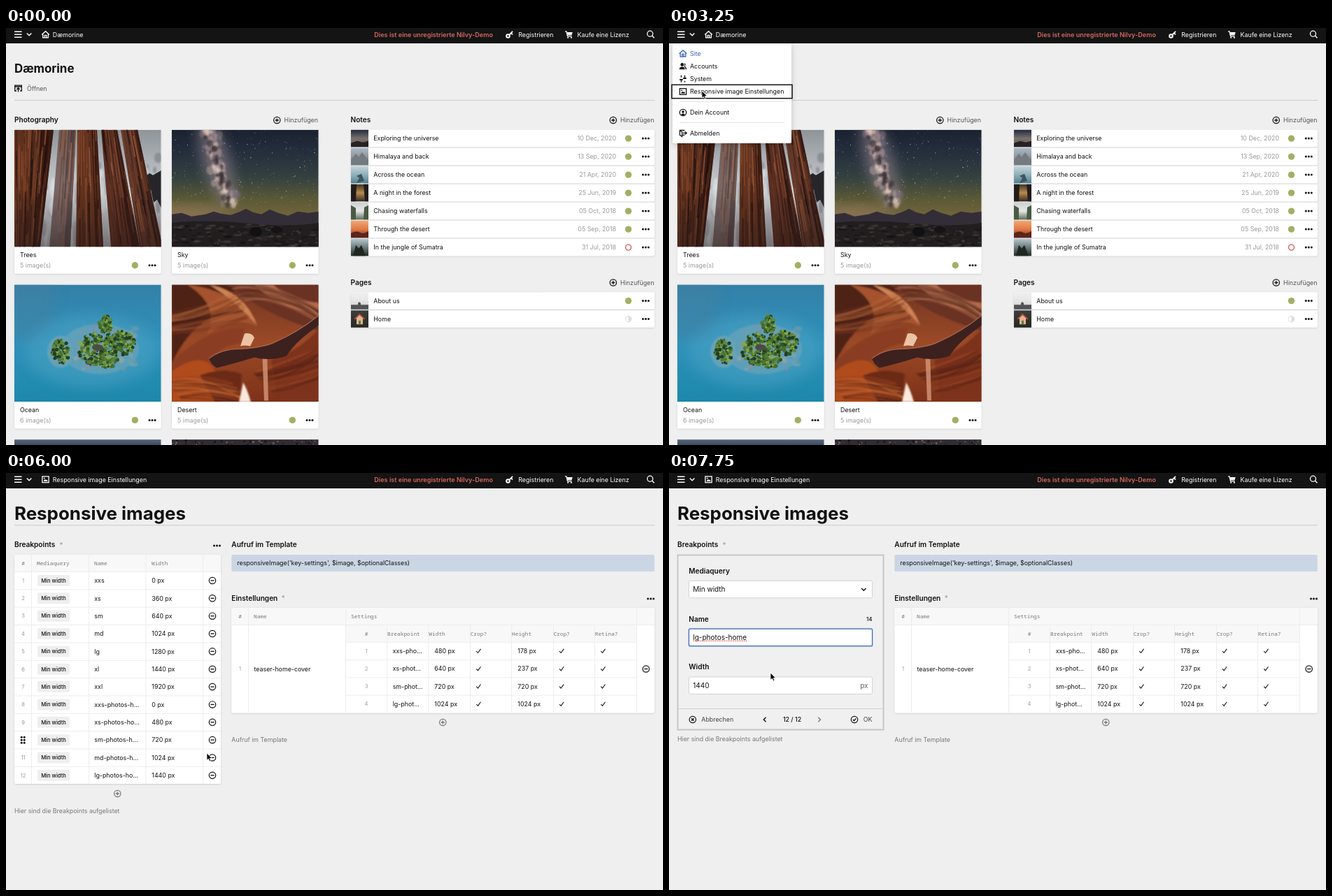
Animation of 939 by 597 pixels, one loop 8000 ms. Source, as an HTML page:

```html
<!DOCTYPE html>
<html lang="de">
<head>
<meta charset="utf-8">
<title>Panel</title>
<style>
html, body { margin: 0; width: 100%; height: 100%; overflow: hidden; background: #efefef; }
svg { display: block; width: 100%; height: 100%; font-family: Inter, Roboto, sans-serif; }
.mono { font-family: "Noto Sans Mono", "DejaVu Sans Mono", monospace; }
text { white-space: pre; }
</style>
</head>
<body>
<svg id="stage" viewBox="0 0 939 597"></svg>
<script>
const INK = '#111', GRAY = '#777', PALE = '#999', LINE = '#ededed';
const SITE = 'Dæmorine';

let seed = 7;
const rnd = (a = 0, b = 1) => {
  seed = (seed * 1664525 + 1013904223) % 4294967296;
  return a + (b - a) * seed / 4294967296;
};
const pick = list => list[Math.floor(rnd(0, list.length))];
const times = (n, fn) => Array.from({ length: n }, (_, i) => fn(i)).join('');

// Basic shapes; text is centred vertically on y
const rect = (x, y, w, h, fill, more = '') =>
  `<rect x="${x}" y="${y}" width="${w}" height="${h}" fill="${fill}" ${more}/>`;
const circle = (x, y, r, fill, more = '') =>
  `<circle cx="${x}" cy="${y}" r="${r}" fill="${fill}" ${more}/>`;
const ellipse = (x, y, rx, ry, fill, more = '') =>
  `<ellipse cx="${x}" cy="${y}" rx="${rx}" ry="${ry}" fill="${fill}" ${more}/>`;
const fillPath = (d, fill, more = '') => `<path d="${d}" fill="${fill}" ${more}/>`;
const stroke = (d, color = INK, w = 1.2, more = '') =>
  `<path d="${d}" fill="none" stroke="${color}" stroke-width="${w}" ${more}/>`;
const group = (s, more = '') => `<g ${more}>${s}</g>`;
const at = (x, y, s) => group(s, `transform="translate(${x} ${y})"`);
const text = (x, y, s, { size = 8.85, fill = INK, weight = 400, anchor = 'start', cls = '' } = {}) =>
  `<text x="${x}" y="${y + size * .364}" font-size="${size}" fill="${fill}" font-weight="${weight}" text-anchor="${anchor}" class="${cls}">${s}</text>`;
const head = (x, y, s) => text(x, y, s, { size: 10.1, weight: 600 });
const mono = (x, y, s, anchor = 'start') =>
  text(x, y, s, { size: 7.8, fill: GRAY, cls: 'mono', anchor });
const num = (x, y, s) => text(x, y, s, { size: 7.6, fill: PALE, anchor: 'middle' });
const grad = (id, ...stops) => `<linearGradient id="${id}" x2="0" y2="1">` +
  stops.map((c, i) => `<stop offset="${i / (stops.length - 1)}" stop-color="${c}"/>`).join('') + '</linearGradient>';

// Icons
const ring = (x, y, d, color = INK) =>
  at(x, y, circle(0, 0, 4.7, 'none', `stroke="${color}" stroke-width="1.2"`) + stroke(d, color, 1.3));
const plus = (x, y, color) => ring(x, y, 'M-2.6 0H2.6M0-2.6V2.6', color);
const minus = (x, y) => ring(x, y, 'M-2.6 0H2.6');
const more = (x, y) => times(3, i => circle(x - 4 + 4 * i, y, 1.5, INK));
const grip = y => times(6, i => circle(22.2 + i % 2 * 4, y - 4 + (i >> 1) * 4, 1.5, INK));
const check = (x, y) => stroke(`M${x} ${y + .3}l2.2 2.4l4-5.6`, INK, 1.1);
const house = (x, y, c) => at(x, y, stroke('M-5.3 .3L0-4.6L5.3 .3M-3.8-.8V4.6H3.8V-.8M-1.2 4.6V1H1.2V4.6', c, 1.3));
const picture = (x, y, c) => at(x, y,
  stroke('M-4.6-4.4H4.6V4.4H-4.6Z', c, 1.3) + fillPath('M-3 2.8L-.8-.6L.6 1L1.6 0L3.2 2.8Z', c) + circle(-1.8, -1.8, .9, c));
const live = (x, y) => circle(x, y, 4.7, '#a5ae62');
const add = (x, y) => plus(x, y, INK) + text(x + 10.3, y, 'Hinzufügen', { fill: '#555' });

// Photographs, drawn on a 210 by 168 field
const soft = (s, alpha = 1) => group(s, `filter="url(#soft)" opacity="${alpha}"`);
const haze = (s, alpha = 1) => group(s, `filter="url(#blur)" opacity="${alpha}"`);

const trunk = (a, b, c, d, color) => {
  const edge = (u, y) => a + (b - a) * u + ((c - a) * (1 - u) + (d - b) * u) * y / 168;
  const bark = times(Math.round((b - a) * 1.8), () => {
    const u = rnd(.03, .97), y = rnd(-60, 130), end = y + rnd(30, 110);
    return stroke(`M${edge(u, y)} ${y}L${edge(u, end)} ${end}`, pick(['#1f0e0c', '#2e1611', '#a5603c', '#8a4729']), rnd(.5, 2.2), `opacity="${rnd(.25, .7)}"`);
  });
  const shade = fillPath(`M${edge(.72, 0)} 0H${b}L${d} 168H${edge(.72, 168)}Z`, '#1c0d0c', 'opacity=".5"');
  return fillPath(`M${a} 0H${b}L${d} 168H${c}Z`, color) + shade + bark;
};
const trees = () => rect(0, 0, 210, 168, 'url(#fog)') +
  soft(times(60, () => ellipse(rnd(40, 210), rnd(40, 168), rnd(1, 6), rnd(4, 18), pick(['#eceef0', '#d8dce0', '#6d7279', '#8b9097']))), .5) +
  group(trunk(64, 88, 50, 80, '#66504e'), 'opacity=".8"') +
  fillPath('M184 70L193 62L198 65L210 58V112L204 100L199 104L195 86L188 82Z', '#26262a') +
  trunk(152, 176, 179, 212, '#62382a') + trunk(124, 147, 138, 179, '#5a2f22') +
  trunk(90, 118, 88, 127, '#63331f') + trunk(-14, 56, -6, 37, '#5e311f') +
  rect(0, 0, 210, 168, 'url(#shade)');

const milky = (n, w, colors, r, alpha) => times(n, () => {
  const u = rnd(), spread = (rnd() + rnd() - 1) * w;
  return ellipse(50 + 34 * u + spread, 108 * u, rnd(r / 3, r), rnd(r / 3, r * 1.3), pick(colors), `opacity="${alpha}"`);
});
const sky = () => rect(0, 0, 210, 168, 'url(#night)') +
  haze(ellipse(64, 46, 20, 66, '#8d7f88', 'transform="rotate(-17 64 46)"'), .6) +
  soft(milky(70, 17, ['#c7aaa4', '#8d7f8a', '#6c6674'], 6, .45) + milky(34, 9, ['#f0d9cb', '#dbb7a8'], 5, .5) +
    milky(22, 11, ['#2b2730', '#3d3238'], 5, .65)) +
  times(330, () => circle(rnd(0, 210), rnd(0, 108), rnd(.2, .6), '#e6ebf2', `opacity="${rnd(.2, .9)}"`)) +
  haze(ellipse(20, 118, 60, 8, '#ad8a72'), .55) +
  fillPath('M0 121L14 119L28 124L48 121L60 117L70 120L84 122L98 117L106 113L116 118L128 121L140 114L152 119L166 123L180 117L195 119L210 117V168H0Z', '#332d38') +
  fillPath('M0 133Q50 128 110 134T210 133V168H0Z', '#211e1f') +
  times(170, () => ellipse(rnd(0, 210), rnd(135, 168), rnd(1, 6), rnd(.5, 2), pick(['#121112', '#38332f', '#4b443f', '#191718']), 'opacity=".6"')) +
  ellipse(120, 146, 9, 7, '#111012') + ellipse(150, 143, 8, 5, '#141315');

const leaf = (x, y, rx, ry, n) => times(n, () => {
  const a = rnd(0, 6.283), r = Math.sqrt(rnd());
  return circle(x + rx * r * Math.cos(a), y + ry * r * Math.sin(a), rnd(1, 2.9), pick(['#2f5427', '#456f2e', '#5f8a36', '#82a94a', '#233f22', '#587b35']));
});
const ocean = () => rect(0, 0, 210, 168, 'url(#sea)') +
  haze(ellipse(110, 95, 95, 52, '#4fa3c4'), .5) + haze(ellipse(10, 20, 50, 60, '#4a7f9f'), .4) +
  soft(ellipse(122, 92, 56, 36, '#6fa3b8') + ellipse(66, 96, 19, 23, '#7ba6b4'), .65) +
  soft(times(50, () => ellipse(rnd(88, 174), rnd(62, 122), rnd(2, 6), rnd(2, 5), pick(['#a5a9a2', '#8d8fa0', '#7c9da4']))), .55) +
  leaf(66, 96, 12, 18, 110) + leaf(112, 93, 20, 23, 200) + leaf(150, 84, 23, 18, 200) +
  leaf(130, 57, 10, 13, 80) + leaf(132, 108, 18, 11, 110) + ellipse(119, 90, 8, 4.5, '#4d4c42');

const strata = (n, x, y, dx, dy, colors) => times(n, () => {
  const o = rnd(-14, 14);
  return stroke(`M${x + o} ${y + o}q${dx * .5} ${rnd(-16, 4)} ${dx} ${dy + rnd(-10, 10)}`, pick(colors), rnd(.6, 3), `opacity="${rnd(.15, .5)}"`);
});
const desert = () => rect(0, 0, 210, 168, 'url(#rock)') + soft(
  fillPath('M0 0H92Q84 30 54 48Q22 66 0 112Z', '#4f2419') +
  fillPath('M22 0Q92 8 122 60Q88 44 50 72Q70 30 22 0Z', '#a4532f') +
  fillPath('M54 0Q104 10 122 58Q92 24 54 0Z', '#cf8354') +
  fillPath('M88 0Q118 38 210 66V0Z', '#6b3123') +
  fillPath('M118 0Q150 33 210 42V26Q165 22 145 0Z', '#b3694a') +
  fillPath('M0 112Q46 62 104 62L98 84Q68 88 54 106Q40 120 0 150Z', '#8a3c20') +
  fillPath('M0 124Q45 92 62 124Q70 150 96 168H0Z', '#b04b1f') +
  fillPath('M40 130Q70 118 100 128L96 168H62Z', '#6b2a18') +
  fillPath('M142 108Q180 96 210 64V168H152Z', '#7d321c') +
  strata(40, -20, 60, 120, -30, ['#35150f', '#c3703f', '#7c3620']) +
  strata(40, 90, 10, 130, 40, ['#3d1a13', '#c98059', '#8d4630']) +
  strata(40, 0, 150, 100, 10, ['#541f11', '#d9753a', '#96401c']) +
  strata(36, 130, 140, 90, -30, ['#401a11', '#b65a33', '#692a18'])) +
  fillPath('M104 70Q114 68 118 76L112 88Q104 86 98 88Z', '#edc3a6') +
  fillPath('M129 92H136L138 166H132Z', '#d59879', 'opacity=".8"') +
  fillPath('M53 106Q70 92 98 92Q132 90 148 82Q180 68 210 44V58Q176 82 164 102Q140 110 118 104Q86 114 64 119Q56 114 53 106Z', '#3c211e') +
  stroke('M53 106Q70 92 98 92Q132 90 148 82Q180 68 210 44', '#a76550', 1.2) +
  soft(fillPath('M96 168L102 140Q108 150 113 168Z', '#fbe9dd'));

const shadow = 'filter="url(#drop)"';
const card = (x, y, photo, title, note) => at(x, y,
  rect(0, 0, 209.5, 206, '#fff', `rx="2" ${shadow}`) +
  `<svg width="209.5" height="167.5" viewBox="0 0 209.5 167.5">${photo}</svg>` +
  text(8, 179.5, title) + text(8, 194, note, { fill: PALE }) + live(172.3, 194) + more(197, 194));

const thumb = (colors, d, ink) => {
  const id = 'th' + colors.join('').replace(/#/g, '');
  return `<defs>${grad(id, ...colors)}</defs>` + rect(0, 0, 25, 24.5, `url(#${id})`) + fillPath(d, ink);
};
const thumbs = [
  [['#222b3d', '#79706e', '#665f45'], 'M0 19L9 16L17 18L25 16V24.5H0Z', '#252125'],
  [['#aab9c8', '#8f989d', '#5d6058'], 'M0 17L7 8L11 13L16 6L25 18V24.5H0Z', '#737b80'],
  [['#c5d4d9', '#8fb0ba', '#537f8f'], 'M8 14L15 11L19 21L8 24.5L12 17Z', '#3c5661'],
  [['#3e3226', '#b98b4f', '#302923'], 'M0 0H8L7 24.5H0ZM18 0H25V24.5H20Z', '#201d1a'],
  [['#cbd0cf', '#e4e7e6', '#5c6c58'], 'M0 4L7 8V24.5H0ZM19 7L25 4V24.5H18Z', '#4a5944'],
  [['#f1a875', '#e17945', '#6e2f20'], 'M0 18Q8 14 13 17T25 15V24.5H0Z', '#5b251c'],
  [['#b7c6cd', '#6a7c7c', '#222b26'], 'M3 24.5L7 9L11 14L15 9L21 24.5Z', '#202620'],
  [['#f0f0f0', '#e6e6e7', '#c9c9ca'], 'M0 18H10V16Q12 12 14 16V18H25V24.5H0Z', '#515356'],
  [['#3b403c', '#31342f', '#272923'], 'M6 12L12 6L19 12H17V20H8V12Z', '#dfb68c']
];
const row = (y, i, title, date = '') => at(493, y,
  rect(0, 0, 434, 24.5, '#fff', `rx="2" ${shadow}`) + thumb(...thumbs[i]) +
  (i === 8 ? stroke('M5 12.5L12.3 5.5L20 12.5', '#b3463b', 1.8) + rect(11, 14.5, 3, 5.5, '#5f7a4a') : '') +
  text(32.3, 12.3, title) + text(379, 12.3, date, { fill: PALE, anchor: 'end' }) +
  (i === 6 ? circle(396.5, 12.3, 4, '#fff', 'stroke="#cf5b57" stroke-width="1.3"')
    : i === 8 ? circle(396.5, 12.3, 4.2, '#fff', 'stroke="#ddd"') + fillPath('M396.5 8.1a4.2 4.2 0 0 1 0 8.4Z', '#ddd')
    : live(396.5, 12.3)) + more(421.3, 12.3));
const notes = [['Exploring the universe', '10 Dec, 2020'], ['Himalaya and back', '13 Sep, 2020'],
  ['Across the ocean', '21 Apr, 2020'], ['A night in the forest', '25 Jun, 2019'],
  ['Chasing waterfalls', '05 Oct, 2018'], ['Through the desert', '05 Sep, 2018'],
  ['In the jungle of Sumatra', '31 Jul, 2018']];

const home = () =>
  text(12, 58, SITE, { size: 16.9, weight: 700 }) +
  at(17.5, 86.5, stroke('M-2.5 3.5H-4.8V-4.3H4.8V3.5H2.5M-4.8-2.5H4.8M0 5V-.5M-2.2 1.5L0-.8L2.2 1.5', INK, 1.3)) +
  text(30, 86.5, 'Öffnen', { fill: '#555' }) +
  rect(12, 103, 915, 1, '#cbcbcb') +
  head(12, 131.5, 'Photography') + add(387.3, 132) + head(492.5, 131.5, 'Notes') + add(867.8, 132) +
  card(12, 145.7, trees(), 'Trees', '5 image(s)') + card(237, 145.7, sky(), 'Sky', '5 image(s)') +
  card(12, 367.4, ocean(), 'Ocean', '6 image(s)') + card(237, 367.4, desert(), 'Desert', '5 image(s)') +
  rect(12, 589.2, 209.5, 8, 'url(#dusk)') + rect(237, 589.2, 209.5, 8, '#302c32') +
  times(50, () => circle(rnd(238, 446), rnd(590, 597), rnd(.5, 1.8), pick(['#15151a', '#6d565c']))) +
  notes.map(([title, date], i) => row(145.8 + 26 * i, i, title, date)).join('') +
  head(492.5, 364, 'Pages') + add(867.8, 364.5) +
  row(378.3, 7, 'About us') + row(404.3, 8, 'Home');

const menu = () => rect(5, 22.5, 170, 142.5, '#fff', 'rx="2" filter="url(#lift)"') +
  ['Site', 'Accounts', 'System', 'Responsive image Einstellungen', 'Dein Account', 'Abmelden'].map((s, i) =>
    text(30, [36.3, 54.7, 72.8, 91, 121, 150.8][i], s, { fill: i ? INK : '#3b62b4' })).join('') +
  rect(15, 105, 150, 1, '#e2e2e2') + rect(15, 135, 150, 1, '#e2e2e2') +
  house(20, 36.5, '#3b62b4') +
  at(20, 54.7, circle(-1.2, -2.3, 2.4, INK) + fillPath('M-5.3 4.5Q-5 .8-1.2 .8T2.6 4.5Z', INK) + fillPath('M1.8-4.5A2.4 2.4 0 0 1 2.2 0Q5 .8 5.2 4.5H3.8Q3.6 2 1.4 .4Q3-2 1.8-4.5Z', INK)) +
  at(20, 72.8, stroke('M-2.5-5V-2M-2.5 1V5M2.5-5V0M2.5 3V5', INK, 1.4) + stroke('M-4.8 1H-.2M.2-.8H4.8', INK, 1.8)) +
  picture(20, 91, INK) +
  at(20, 121, circle(0, 0, 4.7, 'none', `stroke="${INK}" stroke-width="1.3"`) + circle(0, -1, 1.8, INK) + fillPath('M-3 3Q0 .2 3 3Q0 5 -3 3Z', INK)) +
  at(20, 150.8, stroke('M1.5-3V-4.5H-4.5V2.5L-1.3 4.8V-2L-4.5-4.5M-1 2.5H1.5V1.5M0-.5H5M3-2.7L5.2-.5L3 1.7', INK, 1.3));

// Structure tables
const ROW = 25.35;
const rowY = i => 154 + ROW * i;
const points = [['xxs', 0], ['xs', 360], ['sm', 640], ['md', 1024], ['lg', 1280], ['xl', 1440], ['xxl', 1920],
  ['xxs-photos-h...', 0], ['xs-photos-ho...', 480], ['sm-photos-h...', 720], ['md-photos-h...', 1024], ['lg-photos-ho...', 1440]];
const bars = (xs, y, h) => xs.map(x => rect(x, y, 1, h, LINE)).join('');
const hint = y => text(12, y, 'Hier sind die Breakpoints aufgelistet', { fill: GRAY });

const table = () => more(301.5, 104) +
  rect(12, 117, 295, 328, '#fff', `rx="2" ${shadow}`) + rect(12, 117, 295, 24.5, '#f8f8f8', 'rx="2"') +
  bars([36, 118, 199.5, 281], 117, 328) +
  mono(24.5, 129, '#', 'middle') + mono(44, 129, 'Mediaquery') + mono(126, 129, 'Name') + mono(208, 129, 'Width') +
  points.map(([name, width], i) => {
    const y = rowY(i);
    return rect(12, y - 13, 295, 1, LINE) + group(num(24.5, y, i + 1), `id="n${i}"`) +
      rect(45, y - 8, 46, 16, '#efefef', 'rx="2"') + text(68, y, 'Min width', { size: 7.6, weight: 500, anchor: 'middle' }) +
      text(126.3, y, name) + text(208.3, y, width + ' px') + minus(295, y);
  }).join('') + plus(159.3, 459, GRAY) + hint(483.5);

const field = (y, value) => rect(28.5, y, 262, 24.5, '#fff', 'rx="2" stroke="#d3d3d3"') + text(34.3, y + 12.4, value, { size: 10 });
const form = () =>
  rect(12.5, 117.5, 294, 250, '#f0f0f0', 'stroke="#dcdcdc" stroke-width="3"') +
  rect(12.5, 117.5, 294, 250, 'none', 'stroke="#c4c4c4"') +
  head(28.3, 140, 'Mediaquery') + field(154.3, 'Min width') + stroke('M275 165l3.3 3.3l3.3-3.3', INK, 1.4) +
  head(28.3, 209, 'Name') + text(290.5, 209.5, '14', { size: 8, weight: 500, anchor: 'end' }) +
  rect(28.5, 223.2, 262, 24.5, '#fff', 'rx="2" stroke="#c9d5ee" stroke-width="3"') +
  rect(28.5, 223.2, 262, 24.5, '#fff', 'rx="2" stroke="#4870bd" stroke-width="1.2"') +
  text(34.3, 235.6, 'lg-photos-home', { size: 10 }) +
  stroke('M34.5 240.4H111', '#e0443e', 1.3, 'stroke-dasharray="1.3 1.3"') +
  rect(111.5, 229.5, 1, 12.5, INK, 'id="caret"') +
  head(28.3, 277.7, 'Width') + field(292, '1440') + text(284.5, 304.4, 'px', { size: 10, fill: '#666', anchor: 'end' }) +
  rect(13, 337, 293, 1, '#d2d2d2') +
  ring(33.8, 353, 'M-1.8-1.8L1.8 1.8M1.8-1.8L-1.8 1.8') + text(46.3, 353, 'Abbrechen', { fill: '#444' }) +
  stroke('M138.5 349.8l-3.2 3.2l3.2 3.2', INK, 1.4) + text(176, 353, '12 / 12', { anchor: 'middle', weight: 500 }) +
  stroke('M213.3 349.8l3.2 3.2l-3.2 3.2', GRAY, 1.3) +
  ring(265, 353, 'M-2.1 0L-.5 1.7L2.3-1.7') + text(277.7, 353, 'OK', { fill: '#444' }) + hint(380.5);

const settings = [['xxs-pho...', 480, 178], ['xs-phot...', 640, 237], ['sm-phot...', 720, 720], ['lg-phot...', 1024, 1024]];
const heads = ['Breakpoint', 'Width', 'Crop?', 'Height', 'Crop?', 'Retina?'];
const responsive = () =>
  text(12, 57.8, 'Responsive images', { size: 25.9, weight: 700 }) + rect(12, 74.3, 915, 1, '#cbcbcb') +
  head(12, 102.8, 'Breakpoints') + text(76.5, 103.5, '*', { size: 10, fill: PALE }) +
  head(322.3, 102.8, 'Aufruf im Template') + rect(322.3, 117, 604.5, 24, '#cbd6e4', 'rx="2"') +
  text(330.3, 129, "responsiveImage('key-settings', $image, $optionalClasses)") +
  head(322.3, 179, 'Einstellungen') + text(393.7, 179.5, '*', { size: 10, fill: PALE }) + more(921.5, 180) +
  rect(322.3, 193, 604.5, 150.5, '#fff', `rx="2" ${shadow}`) + rect(322.3, 193, 604.5, 24.5, '#f8f8f8', 'rx="2"') +
  rect(486, 217.5, 415.5, 24.5, '#f8f8f8') + rect(322.3, 217, 604.5, 1, LINE) +
  bars([346, 485, 901], 193, 150.5) + bars([544, 603, 663, 722, 782, 841], 217, 126.5) +
  mono(334.5, 205, '#', 'middle') + mono(354, 205, 'Name') + mono(493, 205, 'Settings') +
  group(num(334.5, 280.5, 1), 'id="rowNum"') + text(354.5, 280.5, 'teaser-home-cover') + minus(914.7, 280.5) +
  mono(515, 230, '#', 'middle') + heads.map((s, i) => mono(545 + 59.35 * i, 230, s)).join('') +
  settings.map(([name, w, h], i) => {
    const y = 254.8 + 25.3 * i;
    return rect(486, y - 13, 415.5, 1, LINE) + num(515, y, i + 1) + text(552.7, y, name) +
      text(612.3, y, w + ' px') + check(672.3, y) + text(731.3, y, h + ' px') + check(791, y) + check(850.3, y);
  }).join('') + plus(624.3, 357, GRAY) + text(322.3, 382, 'Aufruf im Template', { fill: GRAY });

const white = { fill: '#fff' };
const bar = () => rect(0, 0, 939, 22, '#141414') +
  stroke('M12 5.3H22.5M12 9.3H22.5M12 13.3H22.5', '#fff', 1.4) + stroke('M29.8 7.5l3.3 3.3l3.3-3.3', '#fff', 1.4) +
  group(house(56.5, 9.3, '#fff') + text(66.8, 9.3, SITE, white), 'id="crumbHome"') +
  group(picture(56.5, 9.3, '#fff') + text(66.8, 9.3, 'Responsive image Einstellungen', white), 'id="crumbImages"') +
  text(526.3, 9.3, 'Dies ist eine unregistrierte Nilvy-Demo', { size: 9.1, weight: 600, fill: '#d4685f' }) +
  at(719.8, 9.3, circle(-2.3, 2.2, 2.3, 'none', 'stroke="#fff" stroke-width="2"') + stroke('M-.6 .5L4.3-4.4M2-2.2L4.2 .2', '#fff', 1.8)) +
  text(732.3, 9.3, 'Registrieren', white) +
  at(804.5, 9.3, stroke('M-5.5-4.5H-3.5L-2 2.3H4', '#fff', 1.3) + fillPath('M-3-3.3H5.2L4 1H-2Z', '#fff') + circle(-1.3, 4.4, 1.1, '#fff') + circle(3.4, 4.4, 1.1, '#fff')) +
  text(816.5, 9.3, 'Kaufe eine Lizenz', white) +
  at(921.3, 9, circle(-.8, -.8, 4, 'none', 'stroke="#fff" stroke-width="1.3"') + stroke('M2 2L5.2 5.2', '#fff', 1.4));

document.getElementById('stage').innerHTML = `<defs>
  <filter id="blur" x="-50%" y="-50%" width="200%" height="200%"><feGaussianBlur stdDeviation="9"/></filter>
  <filter id="soft" x="-20%" y="-20%" width="140%" height="140%"><feGaussianBlur stdDeviation="1.3"/></filter>
  <filter id="drop" x="-5%" y="-20%" width="110%" height="150%"><feDropShadow dx="0" dy=".7" stdDeviation=".8" flood-opacity=".16"/></filter>
  <filter id="lift" x="-10%" y="-10%" width="120%" height="125%"><feDropShadow dx="0" dy="2" stdDeviation="4" flood-opacity=".2"/></filter>
  ${grad('fog', '#8f9499', '#c9cdd1', '#b4b8bd')}${grad('shade', '#20141400', '#20141400', '#20141470')}
  ${grad('night', '#1b2130', '#252f3d', '#33403f', '#5c5a36', '#7d6a3e', '#252124')}
  ${grad('sea', '#3380a8', '#2f92bb', '#1c88ab')}${grad('rock', '#6f3522', '#9c4a26', '#7c3119')}${grad('dusk', '#57677f', '#3e4a5d')}
  </defs>` + rect(0, 0, 939, 597, '#efefef') +
  group(home(), 'id="home"') +
  group(responsive() + group(table(), 'id="table"') + group(form(), 'id="form"'), 'id="images"') +
  bar() + group(menu(), 'id="menu"') +
  rect(4, 81.3, 172, 19.4, 'none', `id="focus" stroke="${INK}" stroke-width="1.5"`) +
  group('', 'id="grip"') + rect(-3, 596, 288, 14, '#c9c9c9', 'id="status" rx="3"') +
  fillPath('M0 0V10.3L2.4 8.2L4 11.7L5.7 10.9L4.2 7.5H7.4Z', '#000', 'id="cursor" stroke="#fff" stroke-width=".8"');

const $ = id => document.getElementById(id);
const show = (id, on) => $(id).setAttribute('visibility', on ? 'inherit' : 'hidden');

// Pointer stops: time, x, y; a repeated place is a rest
const stops = [[250, 234, 28], [1250, 36, 8], [1500, 30, 13], [2250, 29, 13], [3000, 47, 90], [4250, 47, 90],
  [4500, 165, 146], [4650, 286, 171], [5000, 286, 171], [5250, 640, 265], [5500, 911, 340], [5750, 911, 340],
  [5900, 300, 383], [6000, 287, 401], [6250, 200, 428], [6500, 164, 434], [7000, 153, 436], [7250, 153, 436],
  [7500, 148, 345], [7750, 145, 286]];
function pointer(t) {
  const i = stops.findIndex(s => s[0] >= t);
  if (i < 0) return stops[stops.length - 1].slice(1);
  if (i === 0) return stops[0].slice(1);
  const [a, b] = [stops[i - 1], stops[i]], u = (t - a[0]) / (b[0] - a[0]);
  return [a[1] + (b[1] - a[1]) * u, a[2] + (b[2] - a[2]) * u];
}

const STEP = 250, LOOP = 8000, HOVER_LAG = 80;
let last = -1;
function draw(now) {
  const t = Math.floor(now % LOOP / STEP) * STEP;
  if (t === last) return;
  last = t;
  const images = t >= 3500, edit = t >= 6500;
  show('home', !images);
  show('images', images);
  show('crumbHome', !images);
  show('crumbImages', images);
  show('table', images && !edit);
  show('form', edit);
  show('caret', edit && t < 7500);
  show('menu', t >= 1500 && !images);
  show('focus', t === 3250);
  show('status', t === 3500 || t === 3750);
  $('status').setAttribute('y', t === 3750 ? 588 : 596);

  show('cursor', t >= 250);
  $('cursor').setAttribute('transform', `translate(${pointer(t)})`);

  // Hovered rows swap their number for a grip, a moment behind the pointer
  const [x, y] = pointer(t - HOVER_LAG);
  const hover = images && !edit && x < 307 ? Math.floor((y - 141.3) / ROW) : -1;
  const nested = images && x > 322 && y > 217 && y < 344;
  points.forEach((_, i) => show('n' + i, i !== hover));
  show('rowNum', !nested);
  $('grip').innerHTML = nested ? at(310.3, 0, grip(280.5)) : hover >= 0 ? grip(rowY(hover)) : '';
}
function tick(now) {
  draw(now);
  requestAnimationFrame(tick);
}
draw(0);
requestAnimationFrame(tick);
</script>
</body>
</html>
```
